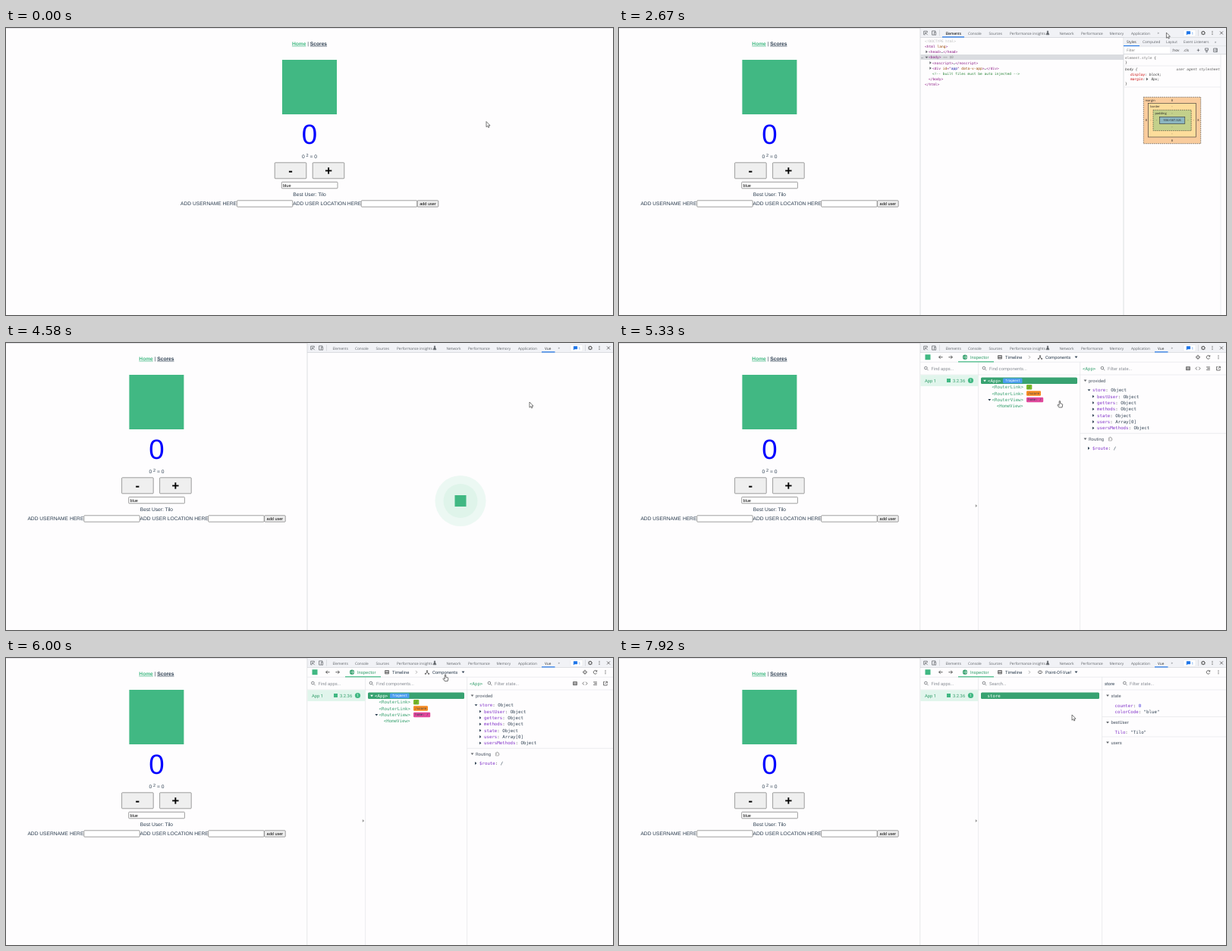
Recreate the animation shown at these times as an HTML page. Size 800 px wide and 379 px high, loop 8 s.

```html
<!DOCTYPE html>
<html lang="en">
<head>
<meta charset="utf-8">
<title>Counter app with developer tools</title>
<style>
html, body { margin: 0; width: 100%; height: 100%; overflow: hidden; background: #fefdfe; }
svg { display: block; width: 100vw; height: 100vh; }
text { white-space: pre; text-rendering: geometricPrecision; }
.page { font-family: "Liberation Sans", Arial, sans-serif; }
.tool { font-family: "Open Sans", sans-serif; }
.ui { font-family: Roboto, sans-serif; }
.mono { font-family: "DejaVu Sans Mono", monospace; }
</style>
</head>
<body>
<svg id="stage" viewBox="0 0 800 379"></svg>
<script>
const GREEN = '#41b883', INK = '#2c3e50', GRAY = '#5f6368', LINE = '#cfd1d6', SOFT = '#e4e6ea';
const BAR = '#f1f2f6', PAPER = '#fefdfe', TAG = '#881280', KEY = '#8030c8', LEAF = '#35a06d';

const esc = s => s.replace(/&/g, '&amp;').replace(/</g, '&lt;');
const group = (id, ...parts) => `<g id="${id}">${parts.join('')}</g>`;
const rect = (x, y, x2, y2, fill, more = '') =>
  `<rect x="${x}" y="${y}" width="${x2 - x}" height="${y2 - y}" fill="${fill}" ${more}/>`;
const path = (d, stroke, width = .8, fill = 'none', more = '') =>
  `<path d="${d}" stroke="${stroke}" stroke-width="${width}" fill="${fill}" ${more}/>`;
const hline = (x, x2, y, color = SOFT) => path(`M${x} ${y}H${x2}`, color, .7);
const vline = (x, y, y2, color = SOFT) => path(`M${x} ${y}V${y2}`, color, .7);
const dot = (x, y, r, fill) => `<circle cx="${x}" cy="${y}" r="${r}" fill="${fill}"/>`;

// Text is placed by its left edge and the middle of its capitals.
const text = (cls, size) => (x, y, s, fill = INK, more = '') => {
  const runs = Array.isArray(s) ? s : [[fill, s]];
  const body = runs.map(([c, part]) => `<tspan fill="${c}">${esc(part)}</tspan>`).join('');
  return `<text class="${cls}" font-size="${size}" x="${x}" y="${y + size * .36}" ${more}>${body}</text>`;
};
const page = text('page', 6.667), form = text('page', 5.555), tool = text('tool', 4.75);
const ui = text('ui', 5.83), tiny = text('ui', 5), code = text('mono', 4.56);
const mono = text('mono', 5.75), chip = text('mono', 4.1);
const MID = 'text-anchor="middle"', END = 'text-anchor="end"', ITALIC = 'font-style="italic"';

const tri = (x, y, open, fill = INK) =>
  path(open ? `M${x - 1.9} ${y - 1}h3.8l-1.9 2.4z` : `M${x - 1} ${y - 1.9}v3.8l2.4-1.9z`, 'none', 0, fill);

const shapes = {
  search: 'M1 1L2.6 2.6M1.2-.6A1.8 1.8 0 1 1-2.4-.6A1.8 1.8 0 1 1 1.2-.6',
  back: 'M2.6 0H-2.4M-.3-2L-2.4 0L-.3 2',
  next: 'M-2.6 0H2.4M.3-2L2.4 0L.3 2',
  more: 'M0-2.5v1M0-.5v1M0 1.5v1',
  close: 'M-2-2L2 2M2-2L-2 2',
  refresh: 'M2-1.2A2.3 2.3 0 1 0 2.2 1M2.3-2.6V-.8H.5',
  target: 'M2 0A2 2 0 1 1-2 0A2 2 0 1 1 2 0M-3 0H-2M2 0H3M0-3V-2M0 2V3M-.6 0H.6',
  gear: 'M2 0A2 2 0 1 1-2 0A2 2 0 1 1 2 0M-2.7 0h.8M1.9 0h.8M0-2.7v.8M0 1.9v.8M-2-2l.6.6M2 2l-.6-.6M2-2l-.6.6M-2 2l.6-.6',
  pick: 'M2.3-.4V-2.3H-2.3V2.3H-.5M-.3-.3L2.7 2.7M-.3 1.6V-.3H1.6',
  device: 'M-2.4-2.6H2V-1.4M-2.4-2.6V2.6H0M.5-1H2.6V2.7H.5Z',
  plus: 'M-1.8 0H1.8M0-1.8V1.8',
  tree: 'M0-1V1M0 0L-2 2M0 0L2 2M-.7-2h1.4v1h-1.4zM-2.7 1.6h1.2v1h-1.2zM1.5 1.6h1.2v1h-1.2z',
  list: 'M-2.4-2.2H2.4V2.2H-2.4ZM-2.4-.7H2.4M-2.4.8H2.4',
  tags: 'M-1.2-2L-3 0L-1.2 2M1.2-2L3 0L1.2 2',
  bars: 'M-2.4-1.8H2.4M-1.2 0H2.4M-2.4 1.8H2.4',
  out: 'M.2-2.4H2.4V-.2M2.4-2.4L-.6.6M-.8-2.2H-2.4V2.4H2.2V.8',
  puzzle: 'M-2.2-1.4H-.6V-2.3H.6V-1.4H1.8V0H2.5V1H1.8V2.4H-2.2V.8H-1.2V-.2H-2.2Z',
  eye: 'M-3 0Q0-3.8 3 0Q0 3.8-3 0ZM-.5 0H.5',
  chat: 'M-2.3-2H2.3V1.3H-1L-2.3 2.4Z',
  brush: 'M-2-2.4H2V0H-2ZM-.7 0V2.6H.7V0',
  dock: 'M-2.4-2.3H2.4V2.3H-2.4ZM1.2-2.3V2.3M.3 0H-1.6',
  flask: 'M-1-2.4H1M-.6-2.4V-.8L-2 2.3H2L.6-.8V-2.4',
  mouse: 'M-1.6-1.2Q0-4 1.6-1.2V1.3Q0 4-1.6 1.3ZM0-2.2V-.4'
};
const icon = (name, x, y, color = GRAY, width = .75, fill = 'none') =>
  path(shapes[name], color, width, fill, `transform="translate(${x} ${y})"`);

function appPage() {
  const box = (x, y, x2, y2, fill) => rect(x, y, x2, y2, fill, 'stroke="#767676" stroke-width=".7" rx=".8"');
  const link = '<tspan font-weight="bold" text-decoration="underline"';
  return group('app',
    page(400, 20.3, [['#42b983', 'Home'], [INK, ' | '], [INK, 'Scores']], INK, MID)
      .replace(/<tspan(?=[^>]*>(Home|Scores))/g, link),
    rect(364, 42, 436, 114, GREEN),
    text('page', 36.67)(400, 140, '0', '#00f', MID),
    page(390, 169.6, '0'),
    form(395.5, 167.7, '2'),
    page(398.7, 169.6, ' = 0'),
    box(354.2, 177.8, 395.8, 198.8, '#efefef'), box(404.2, 177.8, 445.8, 198.8, '#efefef'),
    text('page', 16.67)(375, 188.3, '-', '#000', MID + ' font-weight="bold"'),
    text('page', 16.67)(425, 188.3, '+', '#000', MID + ' font-weight="bold"'),
    box(363.3, 203.4, 437, 211.8, '#fff'), form(365, 207.8, 'blue', '#000'),
    page(400, 219.6, 'Best User: Tilo', INK, MID),
    page(230, 231.8, 'ADD USERNAME HERE'), box(304.4, 227.8, 377.8, 236.2, '#fff'),
    page(378.2, 231.8, 'ADD USER LOCATION HERE'), box(468.2, 227.8, 541.8, 236.2, '#fff'),
    box(542.2, 227.8, 569.8, 236.2, '#efefef'), form(556, 232.1, 'add user', '#000', MID));
}

function tabBar() {
  const tabs = [[430.5, 'Elements'], [460, 'Console'], [487.5, 'Sources'], [515, 'Performance insights'],
    [580.5, 'Network'], [609, 'Performance'], [646.5, 'Memory'], [675, 'Application']];
  return [
    rect(397, 0, 800, 379, PAPER), rect(397, 0, 800, 12.5, BAR),
    hline(397, 800, 12.5, LINE), vline(397, 0, 379, LINE), vline(422.5, 2.5, 10.5, LINE),
    icon('pick', 404, 6.5), icon('device', 415, 6.5), icon('flask', 565, 6.5, GRAY, .6, GRAY),
    ...tabs.map(([x, s]) => tool(x, 6.8, s, GRAY)),
    group('lighthouse', tool(710, 6.8, 'Lighthouse', GRAY)),
    group('barEnd',
      rect(744, 2.5, 760, 11, '#fff', `stroke="${SOFT}" stroke-width=".6" rx="1"`),
      icon('chat', 750.5, 6.6, '#1a73e8', .6, '#1a73e8'), tool(754.5, 6.8, '1', '#1a73e8'),
      vline(763.5, 2.5, 10.5, LINE), icon('gear', 770, 6.5, '#444', .9),
      icon('more', 782, 6.5, '#444', 1), icon('close', 794, 6.5, '#444')),
    group('elementsTab', rect(426, 11.3, 455, 12.5, '#1a73e8'), tool(430.5, 6.8, 'Elements', '#333')),
    group('moreA', tool(709.5, 6.4, '»', GRAY)),
    group('vueTab', rect(706, 11.3, 723.5, 12.5, '#1a73e8'), tool(710, 6.8, 'Vue', '#333'), tool(727.5, 6.4, '»', GRAY))
  ].join('');
}

function domTree() {
  const rows = [
    [403, [['#bbb', '<!DOCTYPE html>']]],
    [403, [[TAG, '<html '], ['#994500', 'lang'], [TAG, '>']]],
    [408, [[TAG, '<head>'], [INK, '…'], [TAG, '</head>']], 0],
    [408, [[TAG, '<body>'], ['#888', ' == $0']], 1],
    [413, [[TAG, '<noscript>'], [INK, '…'], [TAG, '</noscript>']], 0],
    [413, [[TAG, '<div '], ['#994500', 'id'], [TAG, '="'], ['#1a1aa6', 'app'], [TAG, '" '],
      ['#994500', 'data-v-app'], [TAG, '>'], [INK, '…'], [TAG, '</div>']], 0],
    [413, [['#238032', '<!-- built files must be auto injected -->']]],
    [408, [[TAG, '</body>']]],
    [403, [[TAG, '</html>']]]
  ];
  return group('dom', rect(397.4, 35, 665, 42, '#dadce0'), code(398, 38, '…', GRAY),
    ...rows.map(([x, s, open], i) => {
      const y = 17 + i * 7.22;
      return code(x, y, s) + (open === undefined ? '' : tri(x - 2.6, y, open, GRAY));
    }));
}

function stylesPane() {
  const dash = 'stroke="#333" stroke-width=".6" stroke-dasharray="1.6 1.1"', solid = 'stroke="#333" stroke-width=".6"';
  const small = (x, y, s) => text('tool', 4)(x, y, s, '#222', MID);
  const red = '#c80000';
  return group('styles',
    vline(665, 12.5, 379, LINE), rect(665.3, 12.8, 800, 24, BAR), hline(665, 800, 24, LINE),
    rect(665, 23, 686, 24.2, '#1a73e8'),
    tool(669, 18.2, 'Styles', '#333'), tool(690, 18.2, 'Computed', GRAY), tool(721, 18.2, 'Layout', GRAY),
    tool(744, 18.2, 'Event Listeners', GRAY), tool(785, 17.8, '»', GRAY),
    rect(665.3, 24.2, 800, 34.5, BAR), rect(666.5, 25.2, 726, 33.6, '#fff'), hline(665, 800, 34.6, LINE),
    tool(669, 29.5, 'Filter', '#777'), tool(729, 29.3, ':hov', '#333'), tool(744, 29.3, '.cls', '#333'),
    icon('plus', 763.5, 29.3), icon('brush', 774.5, 29.3), icon('dock', 786, 29.3),
    code(667, 39, [['#777', 'element.style'], ['#333', ' {']]), code(667, 45.6, '}', '#333'),
    hline(665, 793, 50), code(667, 54.5, 'body {', '#333', ITALIC),
    code(792, 54.5, 'user agent stylesheet', '#555', END + ' ' + ITALIC),
    code(674, 61, [[red, 'display'], ['#333', ': block;']], red, ITALIC),
    code(674, 67.3, [[red, 'margin'], ['#333', ':   8px;']], red, ITALIC), tri(696, 67.5, 0, GRAY),
    code(667, 73.8, '}', '#333'), hline(665, 793, 78), vline(793, 35, 379))
  + group('boxModel',
    rect(691.3, 91.3, 766.7, 152.7, '#f9cc9d', dash), rect(697.6, 99.3, 760.4, 144, '#fddd9b', solid),
    rect(704, 108.3, 754.2, 135.6, '#c3d08b', dash), rect(712.5, 117.3, 745.8, 126.6, '#8cb6c0', solid),
    small(700, 95.6, 'margin'), small(706.5, 103.8, 'border'), small(714, 113, 'padding'),
    small(729, 95.6, '8'), small(729, 148.5, '8'), small(695, 122, '8'), small(763.5, 122, '8'),
    ...[[729, 104], [729, 113], [729, 131], [729, 140], [701, 122], [708.5, 122], [750, 122], [757.5, 122]]
      .map(([x, y]) => small(x, y, '-')),
    text('tool', 3.9)(729.2, 122, '936×587.326', '#222', MID));
}

function loader() {
  return group('loader', dot(0, 0, 33.5, '#ecf8f3'), dot(0, 0, 22.5, '#dff4ea'), rect(-7.5, -7.5, 7.5, 7.5, GREEN));
}

const pair = (x, y, key, value) => mono(x, y, [[KEY, key], ['#555', ': '], [INK, value]]);
const section = (x, y, s) => tri(x - 4.5, y, 1, GRAY) + ui(x, y, s, '#4a5563');

function inspector() {
  return group('shell',
    rect(397.4, 12.9, 800, 379, PAPER), hline(397, 800, 25.2), hline(397, 800, 42),
    vline(473.6, 25.2, 379), rect(403.5, 15.2, 410.5, 22.2, GREEN),
    icon('back', 424, 18.7, '#333'), icon('next', 437, 18.7, '#333'),
    dot(456, 18.7, 3.1, LEAF), icon('next', 456, 18.7, '#fff', .6),
    ui(463, 18.7, 'Inspector', LEAF), rect(447, 24.2, 494, 25.4, GREEN),
    icon('list', 502, 18.7, '#444'), ui(509, 18.7, 'Timeline'),
    path('M540 16.8l1.8 1.9-1.8 1.9', '#999'), tri(602.5, 18.6, 1),
    icon('refresh', 776.5, 18.7, '#444'), icon('more', 790, 18.7, '#444', 1),
    icon('search', 405, 33.6), ui(411.5, 33.7, 'Find apps...', '#8a8f96'), icon('search', 481.5, 33.6),
    rect(397.4, 42.3, 473.3, 57, '#e1f5ec'), ui(403, 49.6, 'App 1', LEAF),
    rect(432, 47, 437, 52, GREEN), ui(440, 49.6, '3.2.36', LEAF),
    dot(463.5, 49.5, 3.6, GREEN), tiny(463.5, 49.6, '1', '#fff', MID),
    tri(470.8, 215, 0, '#999'))
  + group('componentsView',
    vline(607.6, 25.2, 379), icon('tree', 555, 18.7, '#444'), ui(562, 18.7, 'Components'),
    icon('target', 763, 18.7, '#444'), ui(488, 33.7, 'Find components...', '#8a8f96'),
    group('hoverView', rect(477, 71, 604, 79, '#c5e8d8')),
    group('hoverLink', rect(477, 54.4, 607, 62.6, '#c5e8d8')),
    group('tree',
      rect(477, 45.6, 604, 54, '#38a271', 'rx="1.5"'), tri(482, 49.8, 1, '#fff'), mono(486, 49.9, '<App>', '#fff'),
      rect(506, 46.5, 531.5, 53.2, '#4c9df0', 'rx="1.2"'), chip(518.8, 49.9, 'fragment', '#fff', MID),
      mono(491.5, 58.3, '<RouterLink>', LEAF), rect(537, 55, 544.3, 61.5, '#78b82a', 'rx="1.2"'), chip(540.6, 58.3, '/', INK, MID),
      mono(491.5, 66.6, '<RouterLink>', LEAF), rect(537, 63.3, 556, 69.8, '#f58a22', 'rx="1.2"'), chip(546.5, 66.6, '/score', INK, MID),
      tri(488.3, 75, 1), mono(491.5, 75, '<RouterView>', LEAF),
      rect(537, 71.7, 559.2, 78.3, '#e0489c', 'rx="1.2"'), chip(548, 75, 'home: /', INK, MID),
      mono(497.8, 83.3, '<HomeView>', LEAF)),
    group('appState',
      mono(611, 33.7, '<App>', LEAF), icon('search', 637.5, 33.6), ui(644, 33.7, 'Filter state...', '#8a8f96'),
      icon('list', 750, 33.6, '#444'), icon('tags', 763, 33.6, '#444'), icon('bars', 776.5, 33.6, '#444'), icon('out', 790, 33.6, '#444'),
      section(619, 49.6, 'provided'), tri(619.5, 62.2, 1), pair(624, 62.2, 'store', 'Object'),
      ...['bestUser', 'getters', 'methods', 'state', 'users', 'usersMethods'].map((key, i) =>
        tri(625, 70.6 + i * 8.35, 0) + pair(630, 70.6 + i * 8.35, key, key === 'users' ? 'Array[0]' : 'Object')),
      hline(607.6, 800, 119.3), section(619, 126.6, 'Routing'), icon('puzzle', 647.5, 126.6, '#999'),
      tri(619, 139, 0), pair(624, 139, '$route', '/')))
  + group('storeView',
    icon('eye', 555, 18.7, '#333'), ui(562, 18.7, 'Point-Of-Vue!'), ui(488, 33.7, 'Search...', '#8a8f96'),
    vline(636.6, 25.2, 379), rect(477, 45.6, 633, 54, '#38a271', 'rx="1.5"'), mono(485.5, 49.9, 'store', '#fff'),
    ui(640, 33.7, 'store'), icon('search', 667, 33.6), ui(673, 33.7, 'Filter state...', '#8a8f96'),
    section(648.5, 49.6, 'state'), mono(653.5, 62.5, [[KEY, 'counter'], ['#555', ': '], ['#3b2bd8', '0']]),
    pair(653.5, 71, 'colorCode', '"blue"'), hline(636.6, 800, 77.6),
    section(648.5, 85, 'bestUser'), pair(653.5, 97.6, 'Tilo', '"Tilo"'), hline(636.6, 800, 104),
    section(648.5, 111.5, 'users'))
  + group('dropdown',
    rect(546, 27, 621, 88.5, '#000', 'opacity=".07" rx="2"'), rect(547, 26.5, 620, 87, '#fff', 'rx="1.5"'),
    rect(547, 27.3, 620, 40.2, '#d3f1e4'), group('menuHover', rect(547, 40.6, 620, 53.6, '#eef3f5')),
    icon('tree', 555, 33.7, LEAF), ui(562, 33.7, 'Components', LEAF),
    icon('eye', 555, 47, '#222', .9), ui(562, 47, 'Point-Of-Vue!'), icon('puzzle', 610, 47, '#aaa'),
    rect(552.6, 57.4, 557.6, 63.4, '#222', 'rx=".6"'), ui(562, 60.4, 'Routes'), icon('puzzle', 610, 60.4, '#aaa'),
    hline(547, 620, 67.5), tiny(553, 76.2, 'Scroll to switch', '#777'), icon('mouse', 594, 76, '#444'))
  + group('outline',
    rect(3.3, 37, 393.6, 236.6, GREEN, 'opacity=".35" rx="1.5"'),
    rect(3.5, 26.6, 70, 35.2, '#fff', 'stroke="#9bd8bd" stroke-width=".7" rx="1.2"'),
    chip(6, 31, [[LEAF, '<RouterView>'], ['#999', ' 936×479.22']]));
}

const pointers = group('arrow', path('M0 0V7.2L1.6 5.7L2.7 8L3.9 7.5L2.9 5.2H5Z', '#333', .65, '#fff'))
  + group('hand', path('M-.7 0Q0-1 .7 0V3L3.2 3.7Q4 4 3.8 5L3.2 8.2H-.9L-3 5.2Q-2.7 4.2-1.6 4.9L-.7 5.6Z', '#333', .7, '#fff'));

document.getElementById('stage').innerHTML =
  rect(0, 0, 800, 379, PAPER) + rect(0, 0, 800, 1, '#e7e4e9') + appPage()
  + group('tools', tabBar(), domTree(), stylesPane(), loader(), inspector())
  + group('cursor', pointers);

const $ = id => document.getElementById(id);

// Visible spans in ms: [from, to)
const spans = {
  tools: [1330, 8000], lighthouse: [1330, 1500], barEnd: [1500, 8000], moreA: [1500, 4160],
  elementsTab: [1330, 4160], vueTab: [4160, 8000], dom: [1580, 4160], styles: [1580, 4160], boxModel: [1750, 4160],
  loader: [4250, 4750], shell: [4750, 8000], componentsView: [4750, 7080], tree: [4830, 7080], appState: [4910, 7080],
  hoverView: [5410, 5580], hoverLink: [5580, 5670], outline: [5410, 5670],
  dropdown: [6250, 7080], menuHover: [6750, 7080], storeView: [7080, 8000]
};
const hands = [[5330, 5750], [6000, 7080]];

// Pointer stops: time, x, y
const stops = [[2083, 633, 123.5], [2667, 721.5, 6], [2917, 712, 5], [3083, 712, 5], [3667, 716, 42], [3750, 716, 42],
  [3917, 713, 56], [4083, 712, 58], [4583, 690, 78], [5000, 640, 88], [5417, 566, 74], [5583, 560, 54], [5750, 567, 38],
  [6083, 583, 17], [6500, 583, 18], [6833, 583, 48.5], [7000, 583, 48], [7333, 591, 62], [7917, 597, 75]];

function pointerAt(t) {
  const i = stops.findIndex(s => s[0] > t);
  if (i === 0) return stops[0].slice(1);
  if (i < 0) return stops[stops.length - 1].slice(1);
  const [t0, x0, y0] = stops[i - 1], [t1, x1, y1] = stops[i];
  const k = (t - t0) / (t1 - t0);
  return [x0 + (x1 - x0) * k, y0 + (y1 - y0) * k];
}

const STEP = 1000 / 12;
const within = (t, [from, to]) => t >= from && t < to;
const show = (id, on) => { $(id).style.display = on ? '' : 'none'; };

function draw(ms) {
  const t = Math.floor((ms + 4) / STEP) * STEP % 8000;
  for (const id in spans) show(id, within(t, spans[id]));
  $('app').setAttribute('transform', `translate(${t < 1330 ? 0 : -201.6} 0)`);
  const hand = hands.some(span => within(t, span));
  show('hand', hand);
  show('arrow', !hand);
  $('cursor').setAttribute('transform', `translate(${pointerAt(t).join(' ')})`);
  const pulse = 1 + .05 * Math.sin((t - 4583) / 160);
  $('loader').setAttribute('transform', `translate(599 208.5) scale(${pulse})`);
}

const start = performance.now();
function tick() {
  draw((performance.now() - start) % 8000);
  requestAnimationFrame(tick);
}
tick();
</script>
</body>
</html>
```
